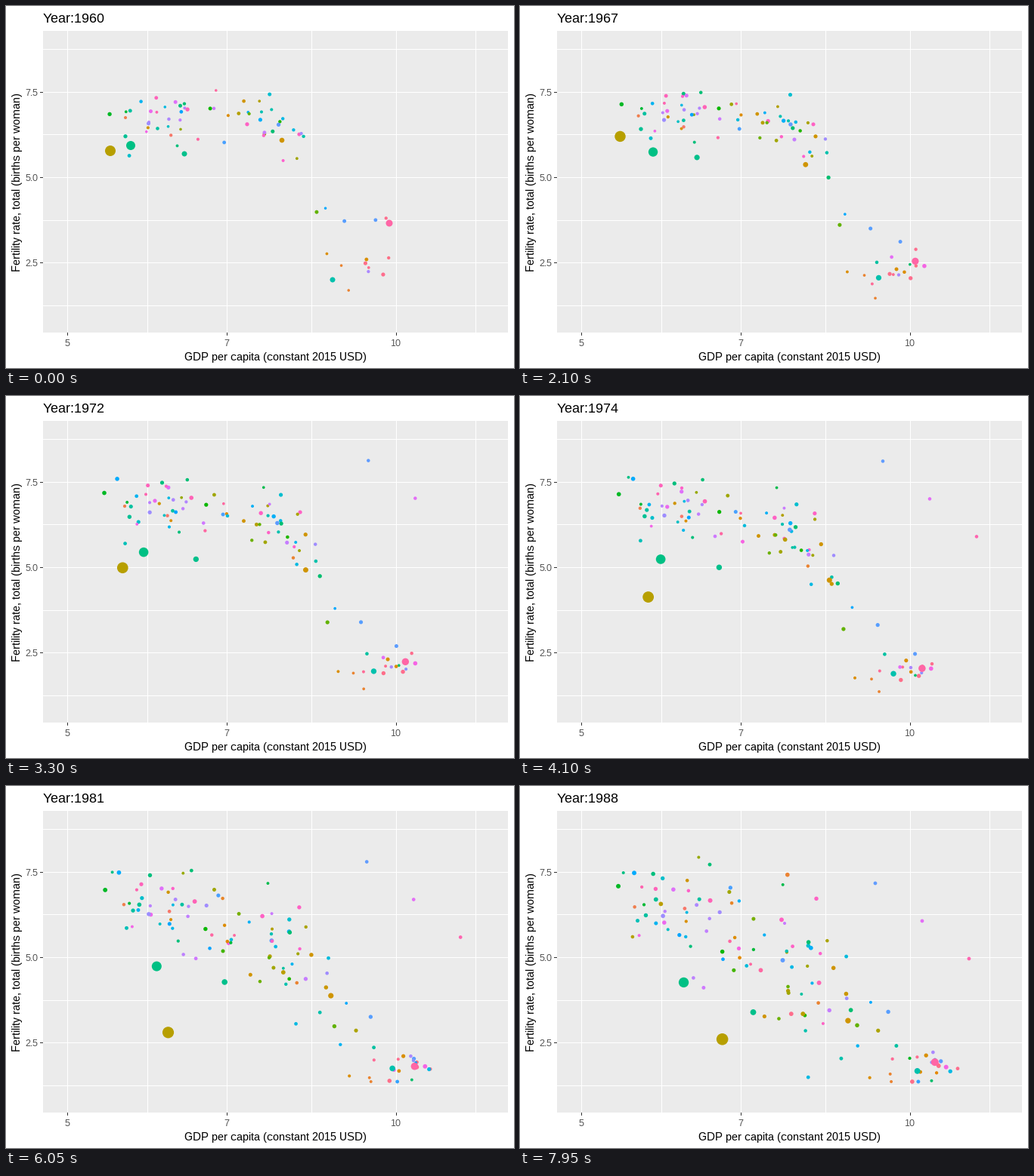
A matplotlib script that plays this animation: 672 by 480 pixels, repeating every 8000 ms.

```python
import numpy as np
import matplotlib.pyplot as plt
from matplotlib.animation import FuncAnimation
from matplotlib.patches import Rectangle

W, H, DPI = 672, 480, 96
LEFT, RIGHT, TOP, BOTTOM = 49, 664, 33, 433
FRAMES, INTERVAL = 160, 50
YEARS_PER_FRAME = 61 / 349
YEARS = np.arange(30)
T = YEARS / 28
N_START, N_NEW = 70, 52

# hue, diameter, then x, y in pixels at the key years
KEY_YEARS = [0, 7.3, 18.4, 27.8]
LEADERS = [
    (165, 7, 236, 196, 233, 200, 281, 243, 309, 301),
    (58, 6.6, 365, 178, 377, 210, 428, 264, 434, 312),
    (182, 7, 432, 363, 475, 360, 505, 373, 526, 378),
    (350, 9, 507, 288, 523, 339, 537, 374, 549, 366),
    (162, 12, 165, 185, 176, 193, 192, 230, 217, 261),
    (75, 14, 138, 192, 131, 169, 192, 323, 269, 336),
]

rng = np.random.default_rng(11)


def hcl(hue, chroma=100, lum=65):
    """Polar LUV colour to sRGB."""
    a = np.radians(hue)
    u = chroma * np.cos(a) / (13 * lum) + 0.1978
    v = chroma * np.sin(a) / (13 * lum) + 0.4683
    y = ((lum + 16) / 116) ** 3
    x, z = 9 * y * u / (4 * v), y * (12 - 3 * u - 20 * v) / (4 * v)
    rgb = np.clip([3.2405 * x - 1.5371 * y - 0.4985 * z,
                   -0.9693 * x + 1.8760 * y + 0.0416 * z,
                   0.0556 * x - 0.2040 * y + 1.0572 * z], 0, 1)
    return np.where(rgb > 0.00313, 1.055 * rgb ** (1 / 2.4) - 0.055, 12.92 * rgb)


def sigmoid(v):
    return 1 / (1 + np.exp(-v))


def final_band(x):
    """Mean height and spread of the cloud in the last year."""
    knots = [120, 220, 300, 400, 460, 520]
    return (np.interp(x, knots, [150, 165, 200, 285, 335, 373]),
            np.interp(x, knots, [35, 38, 50, 55, 38, 11]))


def country():
    """Yearly path: rich ones settle low early, middle ones fall, poor ones linger."""
    rich = rng.random() < 0.27
    x0 = rng.uniform(400, 522) if rich else 100 + 298 * rng.random() ** 0.6
    wealth = sigmoid((x0 - 402) / 9)
    y0 = 153 + 176 * wealth + rng.normal(0, 25)
    x1 = x0 + rng.normal(22 * sigmoid((x0 - 300) / 25) + 24 * wealth, 20 - 11 * wealth)
    y1 = rng.normal(*final_band(x1))
    ease = np.minimum(T * 1.5, 1) if rich else T ** 1.4
    rise = 0 if rich else 9 * np.sin(np.pi * np.minimum(T / 0.7, 1))
    wobble = np.cumsum(rng.normal(0, 1.1, (2, len(YEARS))), axis=1)
    return (x0 + (x1 - x0) * T ** 0.9 + wobble[0],
            np.clip(y0 + (y1 - y0) * ease - rise + wobble[1], 74, 392))


dots = []  # (xs, ys, diameter, hue, first year)
for i in range(N_START + N_NEW):
    born = max(0, i - N_START + 1) * 27 // N_NEW
    size = 3.5 + 1.9 * rng.random()
    dots.append((*country(), size, rng.uniform(15, 375), born))

# oil states: rich, yet with large families
for i in range(3):
    xs = 468 + 62 * i + 12 * np.sin(3 * T)
    ys = 105 + 50 * i - 22 * np.sin(np.pi * T) + 25 * T ** 3
    dots.append((xs, ys, 4.3, 255 + 45 * i, 9 + 2 * i))

for hue, size, *coords in LEADERS:
    xs, ys = (np.interp(YEARS, KEY_YEARS, coords[i::2]) for i in (0, 1))
    dots.append((xs, ys, size, hue, 0))

XS, YS, SIZE, HUE, BORN = (np.array(col) for col in zip(*dots))

plt.rcParams.update({"font.family": "Liberation Sans",
                     "text.hinting": "native", "text.hinting_factor": 1})
fig = plt.figure(figsize=(W / DPI, H / DPI), dpi=DPI, facecolor="white")
ax = fig.add_axes([0, 0, 1, 1])
ax.set(xlim=(0, W), ylim=(H, 0))
ax.axis("off")


def box(x, y, w, h, color):
    ax.add_patch(Rectangle((x, y), w, h, fc=color, lw=0, zorder=1))


def label(x, y, text, size, color="black", **kw):
    return ax.text(x, y, text, fontsize=size, color=color, va="baseline", **kw)


def x_pos(value):
    return 81 + 627.3 * np.log(value / 5)


def y_pos(value):
    return 227 - 45.4 * (value - 5)


box(LEFT, TOP, RIGHT - LEFT, BOTTOM - TOP, "#EBEBEB")

x_breaks = [5, 7, 10]
x_minor = np.sqrt([5 * 7, 7 * 10, 10 * 14])
for value in [*x_breaks, *x_minor]:
    box(round(x_pos(value)), TOP, 1, BOTTOM - TOP, "white")
for value in np.arange(1.25, 9, 1.25):
    box(LEFT, round(y_pos(value)), RIGHT - LEFT, 1, "white")

for value in x_breaks:
    gx = round(x_pos(value))
    box(gx, BOTTOM, 1, 4, "#333333")
    label(gx, 451, str(value), 8.8, "#4D4D4D", ha="center")
for value in (2.5, 5, 7.5):
    gy = round(y_pos(value))
    box(LEFT - 4, gy, 4, 1, "#333333")
    label(42.5, gy + 5, f"{value:.1f}", 8.8, "#4D4D4D", ha="right")

label(356.5, 470, "GDP per capita (constant 2015 USD)", 11, ha="center")
label(19.5, 233.5, "Fertility rate, total (births per woman)", 11, ha="center",
      rotation=90, rotation_mode="anchor")
title = label(49, 22, "", 13.2)

points = ax.scatter(XS[:, 0], YS[:, 0], c=[hcl(h) for h in HUE],
                    linewidths=0, zorder=2)


def update(frame):
    t = frame * YEARS_PER_FRAME
    year, part = int(t), t % 1
    x, y = (P[:, year] * (1 - part) + P[:, year + 1] * part for P in (XS, YS))
    points.set_offsets(np.column_stack([x, y]))
    diameter = SIZE * (1 + 0.004 * t) * 72 / DPI
    points.set_sizes(np.where(BORN <= t, diameter ** 2, 0))
    title.set_text(f"Year:{1960 + round(t)}")
    return points, title


anim = FuncAnimation(fig, update, frames=FRAMES, interval=INTERVAL,
                     repeat=True, repeat_delay=0, init_func=lambda: update(0))
plt.show()
```
